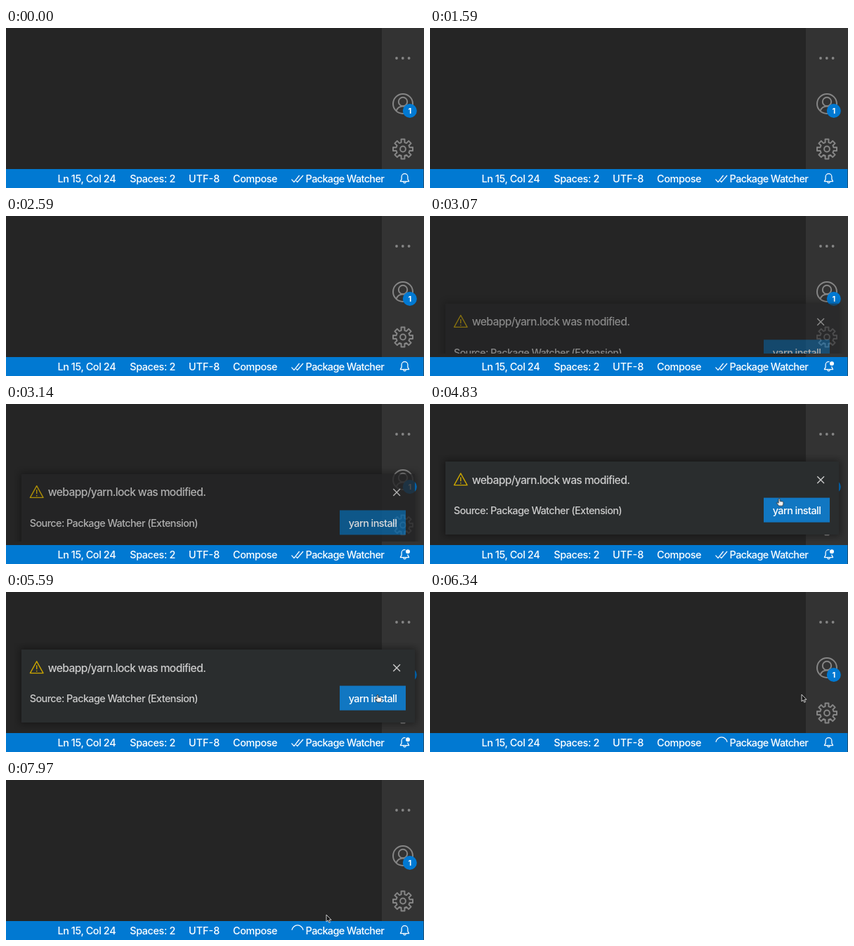
An HTML page that plays this animation: 595x228 px, repeating every 8000 ms.

```html
<!DOCTYPE html>
<html lang="en">
<head>
<meta charset="utf-8">
<title>Package notification</title>
<style>
  html, body { margin: 0; width: 100%; height: 100%; overflow: hidden; background: #252525; }
  .stage { position: absolute; left: 0; top: 0; width: 595px; height: 228px; overflow: hidden; }
  svg { position: absolute; left: 0; top: 0; display: block; overflow: visible; }
  text {
    font: 500 14.4px Inter, "Open Sans", sans-serif;
    text-anchor: middle;
  }
  .line { fill: none; stroke-linejoin: round; }

  .activity { color: #858585; }
  .activity .line { stroke: currentColor; stroke-width: 2; }
  .badge { font-size: 11px; font-weight: 700; fill: #fff; }

  .status text { fill: #fff; letter-spacing: -.38px; }
  .status .label { letter-spacing: -.6px; }
  .status .line { stroke: #fff; stroke-width: 1.25; }

  .clip { position: absolute; left: 12px; top: 72px; width: 580px; height: 124px; overflow: hidden; }
  .toast {
    position: absolute; left: 10px; top: 10px; width: 560px; height: 104px;
    background: #252526; box-shadow: 0 0 10px 2px rgba(0, 0, 0, .4);
  }
  .toast text { fill: #ccc; letter-spacing: -.58px; }
  .toast .title { font-size: 15.6px; letter-spacing: -.63px; }
  .toast .action { fill: #fff; letter-spacing: -.54px; }
  .button { fill: #0a629f; }

  /* Every part shares one 8 s timeline. */
  .toast, .button, .during, .checks, .spinner, .cursor, .arrow, .hand {
    animation: 8s linear infinite;
  }
  .toast { animation-name: slide, hover; animation-timing-function: linear, step-end; }
  .button { animation-name: press; animation-timing-function: step-end; }
  .during { animation-name: during; animation-timing-function: step-end; }
  .checks { animation-name: idle; animation-timing-function: step-end; }
  .spinner { animation-name: busy; animation-timing-function: step-end; }
  .cursor { animation-name: travel; }
  .arrow { animation-name: arrow; animation-timing-function: step-end; }
  .hand { animation-name: hand; animation-timing-function: step-end; }

  @keyframes slide {
    0%, 36.83% { transform: translateY(104px); opacity: 0; animation-timing-function: ease-out; }
    40.58%, 73.249% { transform: none; opacity: 1; }
    73.25%, 100% { transform: none; opacity: 0; }
  }
  @keyframes hover {
    0% { background: #252526; }
    57.3%, 100% { background: #2a2d2e; }
  }
  @keyframes press {
    0% { fill: #0a629f; }
    58.3%, 100% { fill: #1177c2; }
  }
  @keyframes during {
    0% { opacity: 0; }
    36.83% { opacity: 1; }
    73.25%, 100% { opacity: 0; }
  }
  @keyframes idle {
    0% { opacity: 1; }
    73.25%, 100% { opacity: 0; }
  }
  @keyframes busy {
    0% { opacity: 0; }
    73.25%, 100% { opacity: 1; }
  }
  @keyframes travel {
    0%, 54.5% { transform: translate(440px, 234px); }
    57.5% { transform: translate(470px, 180px); }
    60.375% { transform: translate(497px, 134.2px); animation-timing-function: ease-out; }
    64.25%, 95.5% { transform: translate(529px, 146px); animation-timing-function: ease-in-out; }
    99.6%, 100% { transform: translate(456px, 192px); }
  }
  @keyframes arrow {
    0% { opacity: 0; }
    54.5% { opacity: 1; }
    58.3% { opacity: 0; }
    73.25%, 100% { opacity: 1; }
  }
  @keyframes hand {
    0% { opacity: 0; }
    58.3% { opacity: 1; }
    73.25%, 100% { opacity: 0; }
  }
</style>
</head>
<body>
<div class="stage">
  <svg class="activity" width="595" height="228">
    <rect width="535" height="201" fill="#252525"/>
    <rect x="535" width="60" height="228" fill="#333"/>
    <g fill="currentColor">
      <circle cx="556" cy="43" r="1.9"/>
      <circle cx="564.8" cy="43" r="1.9"/>
      <circle cx="573.6" cy="43" r="1.9"/>
    </g>
    <g class="line">
      <circle cx="565" cy="108" r="14"/>
      <circle cx="565" cy="105" r="6.2"/>
      <path d="M555.5 118.3A10 10 0 0 1 574.5 118.3"/>
      <path id="gear"/>
      <circle cx="565" cy="172.5" r="3.9"/>
    </g>
    <circle cx="574.8" cy="118" r="10" fill="#0179d2"/>
    <text class="badge" x="574.8" y="122">1</text>
  </svg>

  <div class="clip">
    <div class="toast">
      <svg width="560" height="104" viewBox="22 82 560 104">
        <g class="line" stroke="#cca700" stroke-width="1.4">
          <path d="M43.7 98.8L53 115.6H34.4Z"/>
          <path d="M43.7 104.3V110.3M43.7 112V113.6"/>
        </g>
        <text class="title" x="172" y="113.5">webapp/yarn.lock was modified.</text>
        <path class="line" stroke="#ccc" stroke-width="1.4" d="M551.3 103.2L561 112.9M561 103.2L551.3 112.9"/>
        <text x="153.4" y="157.4">Source: Package Watcher (Extension)</text>
        <rect class="button" x="475" y="133.6" width="94" height="35"/>
        <text class="action" x="522" y="157.2">yarn install</text>
      </svg>
    </div>
  </div>

  <svg class="status" width="595" height="228">
    <rect y="201" width="594.4" height="27" fill="#0179d2"/>
    <text x="114.8" y="220.2">Ln 15, Col 24</text>
    <text x="208.6" y="220.2">Spaces: 2</text>
    <text x="282.2" y="220.2" style="letter-spacing:0">UTF-8</text>
    <text x="354.6" y="220.2">Compose</text>
    <text class="label" x="482.4" y="220.2">Package Watcher</text>
    <path class="line checks" d="M406.5 215.6L410 219.6L417.6 210M413 217.8L414.8 219.6L423 210"/>
    <path class="line spinner" d="M407 213.8A8.1 8.1 0 0 1 423 213.8"/>
    <g class="line">
      <path d="M561.4 218.6H573.6L571.9 215.4V212A4.4 4.4 0 0 0 563.1 212V215.4Z"/>
      <path d="M565.6 219.4A1.95 1.95 0 0 0 569.4 219.4"/>
    </g>
    <g class="during">
      <circle cx="572" cy="210.2" r="4.3" fill="#0179d2"/>
      <circle cx="572" cy="210.2" r="3" fill="#fff"/>
    </g>
    <g class="cursor">
      <path class="arrow" fill="#151515" stroke="#ddd" stroke-width=".9"
        d="M0 0V10L2.3 7.9L3.8 11.3L5.5 10.6L4 7.3H7Z"/>
      <path class="hand" fill="#f2f2f2" stroke="#222" stroke-width=".8"
        d="M-1 1Q0 -.5 1 1V4.2Q6 4.2 6 6Q6 9 4.5 11H-.5Q-2 9 -4 6.5Q-3 5.3 -1 7Z"/>
    </g>
  </svg>
</div>
<script>
  // Gear outline: eight tapered teeth around a ring.
  const point = (degrees, radius) => {
    const a = degrees * Math.PI / 180;
    return `${(565 + radius * Math.sin(a)).toFixed(2)} ${(172.5 - radius * Math.cos(a)).toFixed(2)}`;
  };
  const teeth = Array.from({ length: 8 }, (_, i) => {
    const a = i * 45;
    return [point(a - 14, 9.8), point(a - 10, 14.2), point(a + 10, 14.2), point(a + 14, 9.8)].join("L");
  });
  document.getElementById("gear").setAttribute("d", `M${teeth.join("L")}Z`);
</script>
</body>
</html>
```
